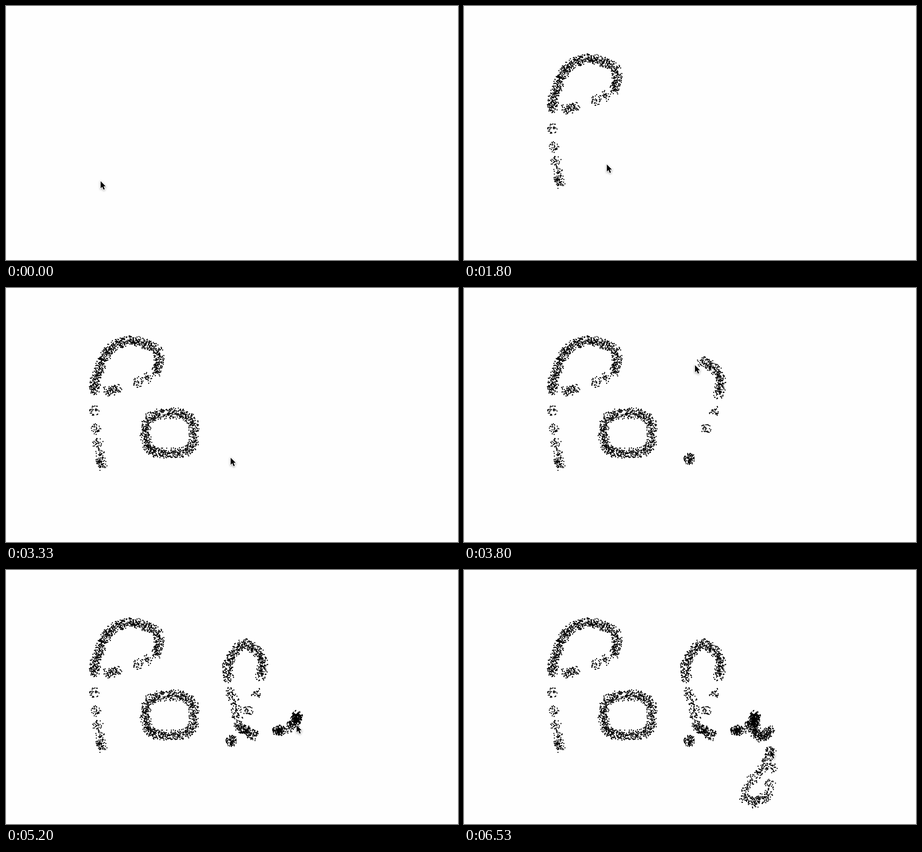
Animation of 998x561 px, one loop 6.73 s. Source, as an HTML page with a canvas:

```html
<!DOCTYPE html>
<html lang="en">
<head>
<meta charset="utf-8">
<title>Spray brush</title>
<style>
  html, body { margin: 0; width: 100%; height: 100%; overflow: hidden; background: #fefefe; }
  canvas { display: block; }
</style>
</head>
<body>
<canvas id="stage" width="998" height="561"></canvas>
<script>
const ctx = document.getElementById("stage").getContext("2d");
const LOOP = 6730, FRAME = 1000 / 15, LAST = 98;
const LAG = 40;       // ink follows the pointer
const PUFF = 32;      // dots in one puff of spray
const SPREAD = 12.5, DOT = 1.3;

const mix = (a, b, u) => a + (b - a) * u;

function seeded(s) {
  return () => {
    s = (s + 0x6D2B79F5) | 0;
    let v = Math.imul(s ^ (s >>> 15), 1 | s);
    v = (v + Math.imul(v ^ (v >>> 7), 61 | v)) ^ v;
    return ((v ^ (v >>> 14)) >>> 0) / 4294967296;
  };
}

// Smooth curve through a few key points (Catmull-Rom), as a polyline.
function curve(...keys) {
  const at = i => keys[Math.max(0, Math.min(keys.length - 1, i))];
  const line = [];
  for (let i = 0; i < keys.length - 1; i++) {
    for (let u = 0; u < 1; u += 0.1) {
      line.push([0, 1].map(k => {
        const [a, b, c, d] = [-1, 0, 1, 2].map(j => at(i + j)[k]);
        return b + u * (c - a + u * (2 * a - 5 * b + 4 * c - d + u * (3 * (b - c) + d - a))) / 2;
      }));
    }
  }
  return [...line, at(keys.length)];
}

// Rounded box, traced clockwise from its lower left corner.
function ring(cx, cy, rx, ry) {
  const bend = v => Math.sign(v) * Math.abs(v) ** 0.65;
  return Array.from({ length: 121 }, (_, i) => {
    const a = Math.PI * (0.75 + i / 60);
    return [cx + rx * bend(Math.cos(a)), cy + ry * bend(Math.sin(a))];
  });
}

// Point at a share of the length of a polyline.
function along(line, share) {
  const span = i => Math.hypot(line[i + 1][0] - line[i][0], line[i + 1][1] - line[i][1]);
  let total = 0;
  for (let i = 0; i < line.length - 1; i++) total += span(i);
  let left = total * share;
  for (let i = 0; i < line.length - 1; i++) {
    const d = span(i);
    if (d && left <= d) return [0, 1].map(k => mix(line[i][k], line[i + 1][k], left / d));
    left -= d;
  }
  return line[line.length - 1];
}

const random = seeded(7);
const dots = [], path = [];

function rest(t, x, y) {
  path.push([t, x, y]);
}

function puff(t, x, y, span) {
  for (let i = 0; i < PUFF; i++) {
    const a = random() * 2 * Math.PI, r = SPREAD * random() ** 0.7;
    dots.push({ t: t + LAG + random() * span, x: x + r * Math.cos(a), y: y + r * Math.sin(a) });
  }
}

// Sprays puffs along a line; ease > 1 speeds up, ease < 1 slows down.
function spray(start, end, puffs, line, ease = 1) {
  for (let i = 0; i <= puffs; i++) {
    const u = i / puffs, t = mix(start, end, u);
    const [x, y] = along(line, u ** ease);
    rest(t, x, y);
    puff(t, x, y, (end - start) / puffs / 2);
  }
}

// P
rest(0, 210, 390);
spray(70, 370, 6, curve([211, 391], [200, 318], [195, 224]), 1.8);
spray(370, 865, 27, curve([195, 222], [204, 184], [236, 128], [292, 119], [336, 142], [331, 185]));
spray(890, 960, 1, curve([312, 199], [292, 208]));
spray(1020, 1100, 2, curve([243, 224], [225, 227]));
rest(1470, 300, 298);

// o
spray(1790, 2640, 31, ring(362, 321, 54, 44));
rest(2930, 309, 396);
rest(3000, 325, 401);

// l
spray(3330, 3370, 2, curve([497, 378], [498, 377]));
spray(3410, 3450, 1, curve([535, 312], [552, 271]));
spray(3490, 4000, 18, curve([562, 233], [565, 195], [527, 163], [493, 200], [491, 238]));
spray(4020, 4150, 4, curve([497, 270], [507, 306], [516, 342]));
spray(4170, 4290, 5, curve([518, 349], [547, 365]));
rest(4470, 556, 364);

// y
rest(4600, 601, 356);
spray(4850, 4940, 4, curve([600, 356], [605, 354]));
spray(4980, 5090, 6, curve([624, 348], [636, 338], [642, 322]), 0.6);
spray(5090, 5460, 13, curve([642, 322], [645, 363], [660, 368], [675, 354]));
spray(5600, 5750, 2, curve([677, 402], [680, 443], [677, 474]));
spray(5780, 5980, 5, curve([672, 497], [641, 514], [621, 504]));
spray(6010, 6300, 5, curve([624, 484], [637, 462], [659, 438], [677, 401]), 0.9);

function pointerAt(t) {
  const i = path.findIndex(p => p[0] > t);
  if (i < 0) return path[path.length - 1].slice(1);
  const [t0, x0, y0] = path[i - 1], [t1, x1, y1] = path[i];
  const u = (t - t0) / (t1 - t0);
  return [mix(x0, x1, u), mix(y0, y1, u)];
}

const arrow = new Path2D("M0 0V15.6L3.6 12.2L6.4 18.6L9 17.5L6.3 11.2H11Z");

function drawPointer(x, y) {
  ctx.save();
  ctx.translate(x - 1, y - 3);
  ctx.shadowColor = "rgba(0,0,0,.4)";
  ctx.shadowBlur = 4;
  ctx.shadowOffsetY = 1.5;
  ctx.strokeStyle = "#fff";
  ctx.lineWidth = 2;
  ctx.stroke(arrow);
  ctx.shadowColor = "transparent";
  ctx.fillStyle = "#000";
  ctx.fill(arrow);
  ctx.restore();
}

function draw(t) {
  ctx.fillStyle = "#fefefe";
  ctx.fillRect(0, 0, 998, 561);
  ctx.fillStyle = "#f5f5f5";
  ctx.fillRect(0, 0, 1, 561);
  ctx.fillRect(997, 0, 1, 561);
  ctx.fillStyle = "#000";
  ctx.beginPath();
  for (const d of dots) {
    if (d.t > t) continue;
    ctx.moveTo(d.x + DOT, d.y);
    ctx.arc(d.x, d.y, DOT, 0, 2 * Math.PI);
  }
  ctx.fill();
  drawPointer(...pointerAt(t));
}

let shown = -1;
function tick() {
  const frame = Math.min(LAST, Math.floor((performance.now() % LOOP + 5) / FRAME));
  if (frame !== shown) draw(frame * FRAME);
  shown = frame;
  requestAnimationFrame(tick);
}
tick();
</script>
</body>
</html>
```
